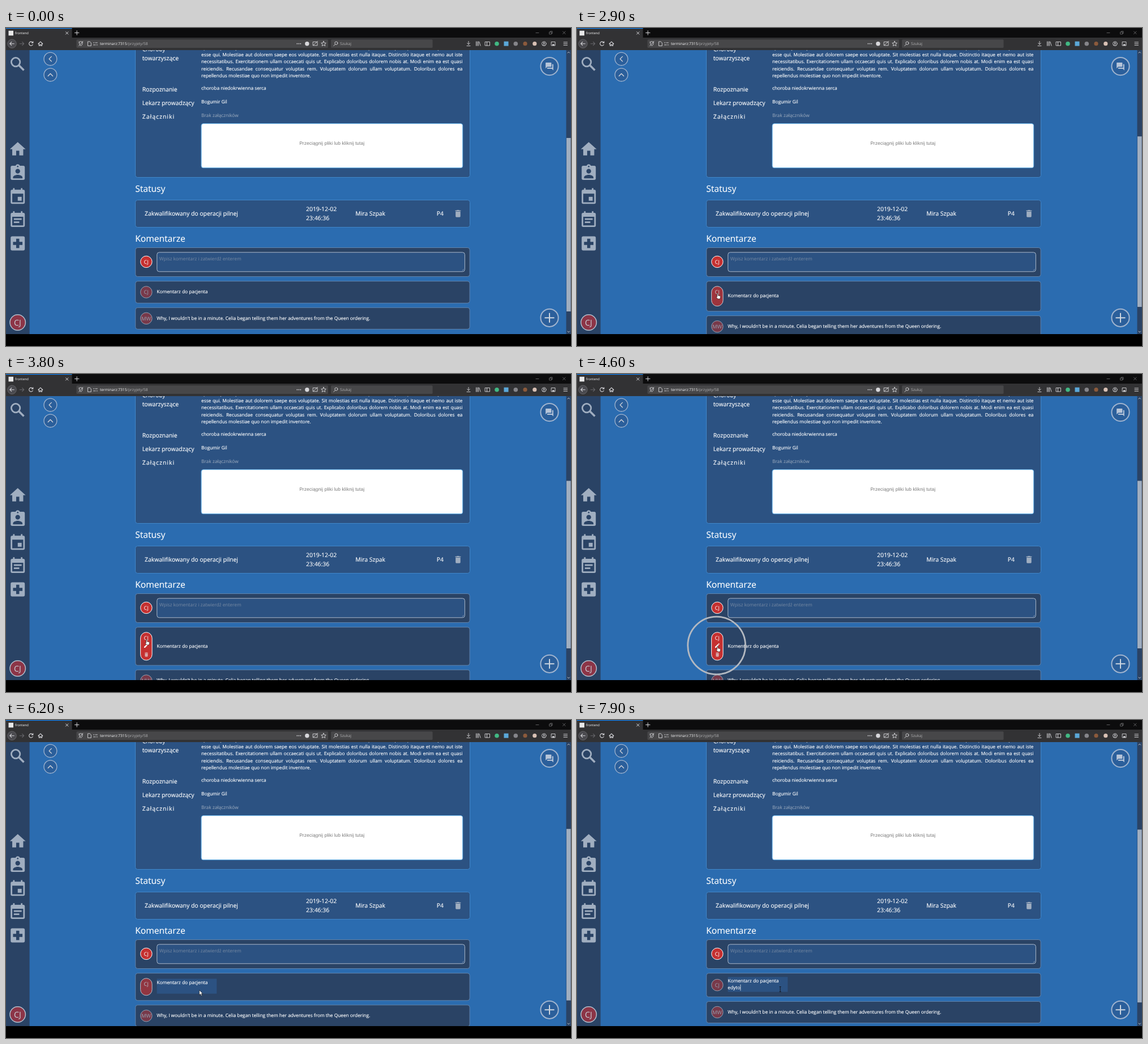
Animation of 998x561 px, one loop 8 s. Source, as an HTML page:

```html
<!DOCTYPE html>
<html lang="pl">
<head>
<meta charset="utf-8">
<title>frontend</title>
<style>
html, body { margin: 0; width: 100%; height: 100%; overflow: hidden; background: #000; }
svg { display: block; }
text, .para { font-family: "Open Sans", "Noto Sans", sans-serif; text-rendering: geometricPrecision; }
text { fill: #fff; stroke: #fff; stroke-width: .15px; font-size: 8.32px; white-space: pre; }
.para { color: #fff; font-size: 8.32px; line-height: 12.47px; -webkit-text-stroke: .15px #fff; }
.para div { height: 12.47px; white-space: nowrap; text-align: justify; text-align-last: justify; }
.para div:last-child { text-align-last: left; }
.head { font-size: 15.6px; }
.big { font-size: 10.4px; }
.wide { letter-spacing: .1em; }
.mid { text-anchor: middle; }
.muted { fill: #a0aec0; stroke: none; }
.hint { fill: #778aa3; stroke: none; }
.drop { font: 8.32px "Liberation Sans", Arial, sans-serif; letter-spacing: .104px; fill: #777; stroke: none; }
.ui { font-size: 6.7px; fill: #f9f9fa; stroke: none; }
.dim { fill: #b1b1b3; }
.panel { fill: #2c5282; stroke: #4186c8; }
.note { fill: #2a4365; stroke: #6f8fb4; stroke-width: .8; }
.avatar { fill: #c53030; stroke: #fff; }
.ini { font-size: 9.1px; text-anchor: middle; stroke: none; }
.round { fill: #2b5f9b; stroke: #a0b4cf; }
.line { fill: none; stroke: #d7d7db; stroke-linecap: round; stroke-linejoin: round; }
</style>
</head>
<body>
<svg width="998" height="561" viewBox="0 0 998 561">
  <defs>
    <clipPath id="view"><rect y="39" width="998" height="501"/></clipPath>
    <path id="bin" d="M6 19c0 1.1.9 2 2 2h8c1.1 0 2-.9 2-2V7H6zM19 4h-3.5l-1-1h-5l-1 1H5v2h14z"/>
    <path id="cal" fill-rule="evenodd" d="M19 3h-1V1h-2v2H8V1H6v2H5a2 2 0 0 0-2 2v14a2 2 0 0 0 2 2h14a2 2 0 0 0 2-2V5a2 2 0 0 0-2-2zm0 16H5V8h14z"/>
  </defs>

  <g clip-path="url(#view)">
    <rect y="39" width="998" height="502" fill="#2b6cb0"/>

    <!-- patient details -->
    <rect class="panel" x="228.5" y="20" width="591" height="243.5" rx="4"/>
    <text class="big" x="240.7" y="41">Choroby</text>
    <text class="big" x="240.7" y="56.6">towarzyszące</text>
    <text class="big" x="240.7" y="111.6">Rozpoznanie</text>
    <text class="big" x="240.7" y="135.6">Lekarz prowadzący</text>
    <text class="big wide" x="240.7" y="159.5">Załączniki</text>
    <foreignObject x="345" y="29.5" width="461.5" height="70">
      <div class="para">
        <div>Quia a quo in provident nemo aut beatae aut soluta dolores sed eum. Quo soluta quo. Qui vel consequatur odio</div>
        <div>esse qui. Molestiae aut dolorem saepe eos voluptate. Sit molestias est nulla itaque. Distinctio itaque et nemo aut iste</div>
        <div>necessitatibus. Exercitationem ullam occaecati quis ut. Explicabo doloribus dolorem nobis at. Modi enim ea est quasi</div>
        <div>reiciendis. Recusandae consequatur voluptas rem. Voluptatem dolorum ullam voluptatum. Doloribus dolores ea</div>
        <div>repellendus molestiae quo non impedit inventore.</div>
      </div>
    </foreignObject>
    <text x="345" y="109.4">choroba niedokrwienna serca</text>
    <text x="345" y="133.4">Bogumir Gil</text>
    <text class="muted" x="345" y="157.3">Brak załączników</text>
    <rect x="345" y="168.7" width="461.7" height="78" rx="3.5" fill="#fff" stroke="#63b3ed"/>
    <text class="drop mid" x="575.7" y="205.7">Przeciągnij pliki lub kliknij tutaj</text>

    <!-- statuses -->
    <text class="head" x="228.3" y="289.2">Statusy</text>
    <rect class="panel" x="228.5" y="303.5" width="591" height="48" rx="4"/>
    <text class="big" x="245" y="331">Zakwalifikowany do operacji pilnej</text>
    <text class="big" x="530" y="323.4">2019-12-02</text>
    <text class="big" x="530" y="339">23:46:36</text>
    <text class="big" x="617.3" y="331">Mira Szpak</text>
    <text class="big" x="760.8" y="331">P4</text>
    <use href="#bin" transform="translate(789.9 318.8) scale(.71)" fill="#a0aec0"/>

    <!-- comments -->
    <text class="head" x="228.3" y="376.9">Komentarze</text>
    <rect class="note" x="228.7" y="387.5" width="590.4" height="51" rx="4"/>
    <circle class="avatar" cx="247.8" cy="412.4" r="10.2"/>
    <text class="ini" x="247.5" y="415.7">CJ</text>
    <rect x="266.7" y="395.8" width="543.7" height="34" rx="4" fill="#2c5282" stroke="#cbd5e0" stroke-width=".8"/>
    <text class="hint" x="270.8" y="409.7">Wpisz komentarz i zatwierdź enterem</text>
    <path class="line" d="M806 428l2.5-2.5" stroke-width=".5"/>

    <rect id="card" class="note" x="228.7" y="446.7" width="590.4" rx="4"/>
    <g id="pill">
      <rect id="pillBox" class="avatar" x="237.6" width="20.4" rx="10.2"/>
      <text id="pillText" class="ini" x="247.5">CJ</text>
      <g id="tools" fill="#fff">
        <path transform="translate(242.6 -6) scale(.44)" d="M3 17.2V21h3.8L17.8 9.9l-3.7-3.7zM20.7 7a1 1 0 0 0 0-1.4l-2.3-2.3a1 1 0 0 0-1.4 0l-1.9 1.8 3.7 3.7z"/>
        <use href="#bin" transform="translate(242.8 10) scale(.43)" fill="#d9a5a8"/>
      </g>
    </g>
    <rect id="editor" x="266.5" width="105.7" height="26.3" fill="#2c5282"/>
    <text id="first" x="266.3">Komentarz do pacjenta</text>
    <text id="second" x="266.3"></text>
    <rect id="caret" width=".7" height="11" fill="#fff"/>

    <g id="last">
      <rect class="note" x="228.7" y=".2" width="590.4" height="38" rx="4"/>
      <g opacity=".5">
        <circle class="avatar" cx="247.8" cy="19.2" r="10.2"/>
        <text class="ini" x="247.6" y="22.5">MW</text>
      </g>
      <text x="266.3" y="21.7">Why, I wouldn't be in a minute. Celia began telling them her adventures from the Queen ordering.</text>
    </g>

    <!-- floating buttons -->
    <g stroke-width="1.3">
      <circle class="round" cx="78.4" cy="54.6" r="11.4"/>
      <circle class="round" cx="78.4" cy="82.6" r="11.4"/>
      <path class="line" stroke="#cbd5e0" d="M80.3 50.4l-4.2 4.2 4.2 4.2M74.2 84.7l4.2-4.2 4.2 4.2"/>
    </g>
    <g stroke-width="2">
      <circle class="round" cx="960" cy="67.6" r="15.6"/>
      <circle class="round" cx="960" cy="511.3" r="15.6"/>
      <path d="M951.5 511.3h17M960 502.8v17" stroke="#cbd5e0"/>
    </g>
    <path transform="translate(951.8 59.7) scale(.68)" fill="#b7c5d9" d="M21 6h-2v9H6v2a1 1 0 0 0 1 1h11l4 4V7a1 1 0 0 0-1-1zm-4 6V3a1 1 0 0 0-1-1H3a1 1 0 0 0-1 1v14l4-4h10a1 1 0 0 0 1-1z"/>

    <!-- sidebar -->
    <rect y="39" width="41.6" height="502" fill="#2a4365"/>
    <g fill="#a0aec0" fill-rule="evenodd">
      <g fill="none" stroke="#a0aec0">
        <circle cx="17.1" cy="60.1" r="7.7" stroke-width="2.8"/>
        <path d="M22.5 65.5l9 9" stroke-width="3.6"/>
      </g>
      <path transform="translate(4.1 197) scale(1.386)" d="M10 20v-6h4v6h5v-8h3L12 3 2 12h3v8z"/>
      <path transform="translate(4.1 238.8) scale(1.386)" d="M19 3h-4.2a3 3 0 0 0-5.6 0H5a2 2 0 0 0-2 2v14a2 2 0 0 0 2 2h14a2 2 0 0 0 2-2V5a2 2 0 0 0-2-2zm-7 0a1 1 0 0 1 0 2 1 1 0 0 1 0-2zm0 4a3 3 0 0 1 0 6 3 3 0 0 1 0-6zm6 12H6v-1.4c0-2 4-3.1 6-3.1s6 1.1 6 3.1z"/>
      <g transform="translate(4.1 281.2) scale(1.386)"><use href="#cal"/><path d="M12 12h5v5h-5z"/></g>
      <g transform="translate(4.1 321.8) scale(1.386)"><use href="#cal"/><path d="M7 10h10v2H7zM7 14h7v2H7z"/></g>
      <path transform="translate(4.1 363.4) scale(1.386)" d="M19 3H5a2 2 0 0 0-2 2v14a2 2 0 0 0 2 2h14a2 2 0 0 0 2-2V5a2 2 0 0 0-2-2zm-1 11h-4v4h-4v-4H6v-4h4V6h4v4h4z"/>
    </g>
    <circle cx="20.7" cy="519.5" r="13.7" fill="#8c3547" stroke="#b4bfcd" stroke-width="1.5"/>
    <text class="ini" x="20.3" y="524.6" style="font-size:14.3px;fill:#cbd0d8">CJ</text>

    <!-- scrollbar -->
    <rect x="989.5" y="39" width="8.5" height="502" fill="#2a4365"/>
    <rect id="thumb" x="990" width="7.5" fill="#a0aec0"/>
    <path class="line" stroke="#a0aec0" stroke-width=".9" d="M992 44l1.8-1.8 1.8 1.8M992 535l1.8 1.8 1.8-1.8"/>
  </g>

  <!-- browser window -->
  <rect width="998" height="17" fill="#0c0c0d"/>
  <path d="M0 0h116.5v17H998v22H0z" fill="#323234"/>
  <rect width="116.5" height="1.1" fill="#0a84ff"/>
  <rect x="4.5" y="4.8" width="8.5" height="8.5" fill="#e8e8e8"/>
  <text class="ui" x="16" y="11.3" style="font-size:5.85px">frontend</text>
  <path class="line" d="M105.5 6.7l4.4 4.4m0-4.4l-4.4 4.4M121.5 8.5h7.4M125.2 4.8v7.4"/>
  <g id="controls" class="line" stroke-width=".8">
    <path d="M936 8.5h5M983.5 6l4.6 4.6m0-4.6l-4.6 4.6"/>
    <path d="M960 7.2h3.7v3.6H960zM961.3 7V5.8h3.7v3.7h-1.2"/>
  </g>

  <circle cx="10.5" cy="27.7" r="7.8" fill="#4a4a4f" stroke="#77777b" stroke-width=".6"/>
  <g class="line" stroke-width="1.1">
    <path d="M14.3 27.7H6.8m3-3l-3 3 3 3"/>
    <path d="M24.2 27.7h7.5m-3-3l3 3-3 3" stroke="#68686c"/>
    <path d="M47.3 29.3a3.5 3.5 0 1 1-.5-4m1-1.5v2.5h-2.5"/>
    <path d="M56.9 28l4-3.8 4 3.8M58.3 27.5v3.8h1.7v-2h1.8v2h1.7v-3.8"/>
  </g>
  <rect x="124.5" y="20.3" width="444.5" height="14.8" rx="1.5" fill="#474749"/>
  <rect x="574" y="20.3" width="179.5" height="14.8" rx="1.5" fill="#474749"/>
  <g class="line" stroke-width=".9">
    <path d="M129 24.8l3.3-1 3 1q0 5-3 6.7-3-1.7-3.3-6.7M128.8 31.5l7-8"/>
    <path d="M144.8 24h3.3l2.2 2.2v5.3h-5.5zM154.5 26h1.3m2 0h3.6M154.5 29.8h3.6m2 0h1.3"/>
    <path d="M542.5 24.5h7.5v6.3h-7.5zM542.5 30.5l8-7"/>
    <path d="M561 23.3l1.3 2.9 3 .3-2.3 2.1.7 3-2.7-1.6-2.7 1.6.7-3-2.3-2.1 3-.3z"/>
    <circle cx="583.3" cy="26.7" r="2.6"/><path d="M581.5 28.7l-2.7 2.8"/>
    <path d="M817 23.5v5.5m-2.4-2.3l2.4 2.4 2.4-2.4M814 31.5h6"/>
    <path d="M830.5 24v7.3m2-7.3v7.3m2-7.3v7.3m1.3-7l2.3 7"/>
    <path d="M846.5 24.5h8v6.5h-8zM849.5 24.5v6.5"/>
    <circle cx="950.3" cy="27.7" r="3.7"/><path d="M948 30.3q2.3-2.2 4.6 0"/>
    <path d="M963.5 24.5h6.5v6.5h-6.5zM985 25h6.5m-6.5 2.7h6.5m-6.5 2.7h6.5"/>
  </g>
  <g fill="#d7d7db">
    <circle cx="514.3" cy="27.7" r=".9"/><circle cx="517.3" cy="27.7" r=".9"/><circle cx="520.3" cy="27.7" r=".9"/>
    <circle cx="531.8" cy="27.7" r="3.7"/>
    <circle cx="950.3" cy="26.8" r="1.3"/>
    <path d="M965 28.5h3.5V31H965z"/>
  </g>
  <circle cx="867" cy="27.7" r="3.8" fill="#41b883"/>
  <rect x="879.5" y="23.7" width="8" height="8" fill="#5aa7d8"/>
  <circle cx="900.3" cy="27.7" r="3.8" fill="#85858a"/>
  <circle cx="917" cy="27.7" r="3.6" fill="#8b5a3c"/>
  <circle cx="933.8" cy="27.7" r="3.6" fill="#d8c0b4"/>
  <text class="ui" x="166" y="30.3">terminarz:7315<tspan class="dim">/przyjety/58</tspan></text>
  <text class="ui dim" x="590" y="30.3">Szukaj</text>

  <!-- pointer -->
  <circle id="ring" cx="246.6" cy="479" fill="none" stroke="#b4b9c1" stroke-width="2.8"/>
  <g id="pointer">
    <path id="arrow" transform="scale(.54)" d="M0 0v15.5l3.7-3.4 2.8 6.2 2.6-1.2-2.7-6h5z" fill="#fff" stroke="#000"/>
    <path id="hand" transform="scale(.55) translate(-6 -1)" d="M6.3 1q1.5 0 1.5 1.6V8l6 1.3q2 .6 2 2.4l-.8 5.8q-.3 1.5-1.8 1.5H7.5L2 13l1-1.2 2 .9V2.6Q5 1 6.3 1z" fill="#fff" stroke="#000"/>
    <path id="beam" d="M-1.5-4.5h3M0-4.5v9M-1.5 4.5h3" fill="none" stroke="#10151c" stroke-width=".9"/>
  </g>
</svg>
<script>
const LOOP = 8000;
const CARD_TOP = 446.7;
const PILL_MIN = 20.6, PILL_MAX = 49.3;
const EDIT_START = 4900;
const TYPED = ' edyto';
const CARET_ON = [[5300, 5900], [6450, 7000], [7400, LOOP]];
const PATH = [
  [1600, 799.3, 367.5], [2600, 248, 468], [4000, 248, 468], [4300, 248, 480],
  [5900, 248, 480], [6350, 373.7, 475.5], [6450, 373.7, 475.5], [6600, 359, 475]
];

const el = {};
document.querySelectorAll('[id]').forEach(e => el[e.id] = e);

const clamp = v => Math.min(1, Math.max(0, v));
const part = (t, start, length) => clamp((t - start) / length);
const easeOut = v => 1 - (1 - v) ** 2.4;
const smooth = v => v * v * (3 - 2 * v);
const show = (node, on) => { node.style.display = on ? '' : 'none'; };
const set = (node, attrs) => { for (const k in attrs) node.setAttribute(k, attrs[k]); };

function pointerAt(t) {
  let i = 0;
  while (i < PATH.length - 2 && t >= PATH[i + 1][0]) i++;
  const [t0, x0, y0] = PATH[i], [t1, x1, y1] = PATH[i + 1];
  const k = smooth(part(t, t0, t1 - t0));
  return [x0 + (x1 - x0) * k, y0 + (y1 - y0) * k];
}

function drawComment(t) {
  const editing = t >= EDIT_START;
  const hover = easeOut(part(t, 2650, 1000)) - easeOut(part(t, 5870, 900));
  const pill = PILL_MIN + (PILL_MAX - PILL_MIN) * hover;
  const height = Math.max(pill + 18, editing ? 41.8 : 0);
  const mid = CARD_TOP + height / 2;
  const top = mid - pill / 2;

  set(el.card, { height });
  set(el.pillBox, { y: top, height: pill });
  set(el.pillText, { y: top + 13.5 });
  set(el.pill, { opacity: 0.5 + hover / 2 });
  set(el.tools, {
    transform: `translate(0 ${top + 24})`,
    opacity: part(t, 3350, 400) * (1 - part(t, 5900, 250))
  });
  set(el.last, { transform: `translate(0 ${CARD_TOP + height + 7.8})` });

  const grow = (height - 38.6) / 28.7;
  const thumbTop = 194 - 5.5 * grow;
  set(el.thumb, { y: thumbTop, height: 500 - 16 * grow - thumbTop });

  // The typed word wraps to the second line once it no longer fits.
  const count = t < 7400 ? 0 : Math.min(TYPED.length, Math.floor((t - 7400) / 100) + 1);
  const typed = TYPED.slice(0, count);
  const wrapped = count > 3;
  const base = editing ? mid - 4.8 : mid + 2.2;
  el.first.textContent = 'Komentarz do pacjenta' + (wrapped ? '' : typed.replace(' ', '\u00a0'));
  el.second.textContent = wrapped ? typed.trim() : '';
  set(el.first, { y: base });
  set(el.second, { y: base + 12.47 });
  set(el.editor, { y: mid - 14.3 });
  show(el.editor, editing);

  const line = wrapped ? el.second : el.first;
  set(el.caret, { x: 266.6 + line.getComputedTextLength(), y: base - 8.7 + (wrapped ? 12.47 : 0) });
  show(el.caret, CARET_ON.some(([a, b]) => t >= a && t < b));
}

function drawPointer(t) {
  const [x, y] = pointerAt(t);
  set(el.pointer, { transform: `translate(${x} ${y})` });
  show(el.pointer, t >= 1600);
  show(el.arrow, t < 2600 || (t >= 5960 && t < 6500));
  show(el.hand, t >= 2600 && t < 5960);
  show(el.beam, t >= 6500);

  set(el.ring, { r: 51 * (1 - part(t, 4600, 400)) });
  show(el.ring, t >= 4600 && t < 5000);
}

function draw(now) {
  const t = now % LOOP;
  drawComment(t);
  drawPointer(t);
  set(el.controls, { opacity: t >= 5300 && t < 5900 ? 1 : 0.5 });
  requestAnimationFrame(draw);
}
draw(performance.now());
</script>
</body>
</html>
```
